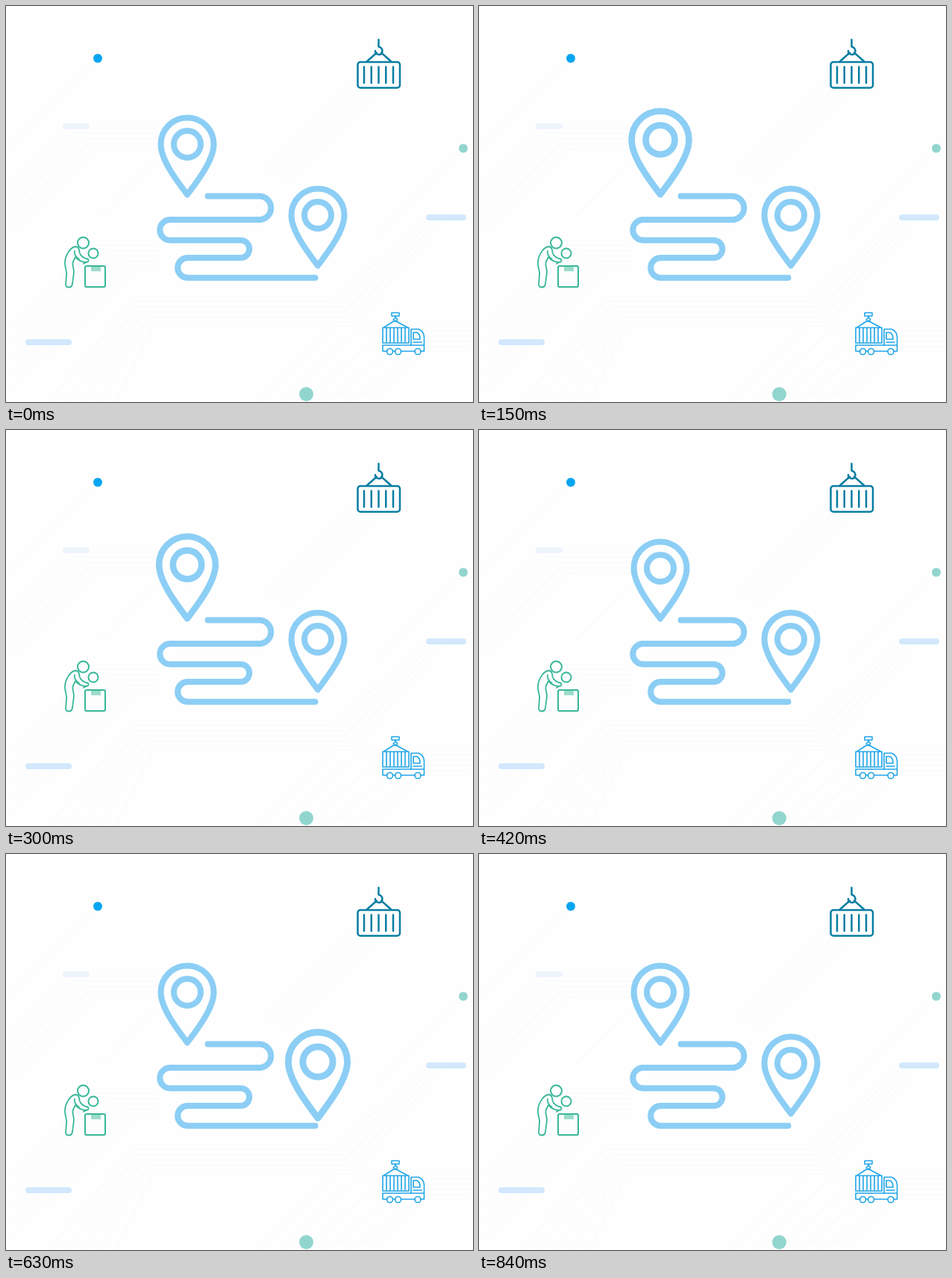
Animation of 626 by 530 pixels, one loop 870 ms. Source, as an HTML page with a canvas:

```html
<!DOCTYPE html>
<html lang="en">
<head>
<meta charset="utf-8">
<title>Delivery route</title>
<style>
html, body { margin: 0; width: 100%; height: 100%; overflow: hidden; background: #fefefe; }
canvas { display: block; width: 626px; height: 530px; }
</style>
</head>
<body>
<canvas id="stage" width="626" height="530"></canvas>
<script>
const ctx = document.getElementById('stage').getContext('2d');
const LOOP = 870, STEP = 30, PULSE = 420, GROWTH = 0.115;
const SKY = '#8ccef5', MINT = '#92d5cf';

function pen(color, width) {
  ctx.strokeStyle = color;
  ctx.lineWidth = width;
  ctx.lineCap = ctx.lineJoin = 'round';
}
const stroke = d => ctx.stroke(new Path2D(d));

function ring(x, y, r) {
  ctx.beginPath();
  ctx.arc(x, y, r, 0, Math.PI * 2);
  ctx.stroke();
}

function dot(x, y, r, color) {
  ctx.fillStyle = color;
  ctx.beginPath();
  ctx.arc(x, y, r, 0, Math.PI * 2);
  ctx.fill();
}

function box(x, y, w, h, r) {
  ctx.beginPath();
  ctx.roundRect(x, y, w, h, r);
  ctx.stroke();
}

function bars(x, gap, count, top, bottom) {
  for (let i = 0; i < count; i++) stroke(`M${x + i * gap} ${top}V${bottom}`);
}

function pill(x, y, w, color) {
  ctx.fillStyle = color;
  ctx.beginPath();
  ctx.roundRect(x, y, w, 8, 4);
  ctx.fill();
}

function circuit() {
  pen('#f7f9fd', 1);
  for (let i = 0; i < 5; i++) {
    const d = i * 7;
    stroke(`M8 ${235 + i * 16}L${80 + i * 10} ${163 + d}H204`);
    stroke(`M8 ${432 + i * 20}L${120 + i * 14} ${320 + d}H204`);
    stroke(`M${60 + i * 22} 528L${168 + i * 8} ${395 + d}H${440 + d}L${556 + d} 288`);
    stroke(`M${340 + i * 30} 528L${440 + i * 30} ${428 + d}H624`);
  }
  for (let i = 0; i < 3; i++) stroke(`M${468 + i * 12} ${98 + i * 9}L${345 + i * 14} ${221 + i * 7}`);
  stroke('M118 76L8 186M609 195L500 304M411 519H496L560 455M203 208L130 281');
}

function container() {
  pen('#087da3', 2.5);
  box(471.5, 75, 56.5, 34.5, 3.5);
  bars(480, 9.75, 5, 81.5, 103);
  stroke('M484 74L497 62.5M516 74L503 62.5');
  stroke('M499.5 45V54.5C506 56 506 65 500 65C496.5 65 494.5 62.5 495 60');
}

function worker() {
  pen('#38b798', 2);
  ring(103.5, 317, 7.5);
  ring(117, 331, 6.5);
  box(106, 348, 27, 28, 2);
  ctx.fillStyle = '#9bdccb';
  ctx.fillRect(114, 349, 13, 6);
  pen('#38b798', 1.8);
  stroke('M93 322C86 323 79 334 79 344C79 351 82 354 81 361L80 372' +
    'C80 378 88 378 89 372L91 356C91 349 88 348 90 342L93 336' +
    'C97 341 103 343 108 343C112 342 111 338 107 338' +
    'C101 336 98 332 98 326C97 323 95 322 93 322Z');
  stroke('M92 328C91 333 94 336 98 339M107 343L104 345');
}

function truck() {
  pen('#20a5e8', 1.6);
  box(517, 410.5, 10, 4.5, 0.5);
  stroke('M522 415V417C526 419 525 423 521 422M522 417L519 420');
  stroke('M507 430L521 421L538 430');
  box(505, 430.5, 35, 20.5, 0);
  bars(510, 5, 6, 431, 450);
  stroke('M511 462H505V454H543V432.5H553Q560 435 560.5 443V462H556M519 462H522M530 462H548');
  stroke('M546 446V437H551Q555 439 555 446ZM546 450H557M543 454H560');
  for (const x of [514.5, 525.5, 552]) ring(x, 462.5, 4);
}

function route() {
  pen(SKY, 8);
  stroke('M270.5 254.5H339.5A15.7 15.7 0 0 1 339.5 286H220' +
    'A13.7 13.7 0 0 0 220 313.5H314.5A11.7 11.7 0 0 1 314.5 337H243.5' +
    'A13.4 13.4 0 0 0 243.5 363.8H414.5');
}

// The pin is drawn around the centre of its ring; it grows from pivotY.
function pin(x, y, pivotY, scale) {
  ctx.save();
  ctx.translate(x, y + pivotY);
  ctx.scale(scale, scale);
  ctx.translate(0, -pivotY);
  pen(SKY, 8);
  stroke('M0 67.5C-14 49-35.5 21-35.5 0A35.5 35.5 0 0 1 35.5 0C35.5 21 14 49 0 67.5Z');
  ring(0, 0, 18);
  ctx.restore();
}

function pulse(time) {
  const p = time / PULSE;
  return 1 + GROWTH * Math.max(0, 1 - Math.abs(2 * p - 1));
}

function draw(now) {
  const time = Math.floor((now % LOOP) / STEP) * STEP;
  ctx.fillStyle = '#fefefe';
  ctx.fillRect(0, 0, 626, 530);
  circuit();
  pill(26, 446, 62, '#d2e8fc');
  pill(563, 279, 54, '#d2e8fc');
  pill(76, 157, 36, '#edf4fc');
  dot(123, 70, 6, '#08a5f2');
  dot(613, 190.5, 6, MINT);
  dot(402.5, 519.5, 9.5, MINT);
  container();
  worker();
  truck();
  route();
  pin(243, 185, 71.5, pulse(time));
  pin(418, 280, 16.5, pulse(time - PULSE));
}

const start = performance.now();
function tick() {
  draw(performance.now() - start);
  requestAnimationFrame(tick);
}
tick();
</script>
</body>
</html>
```
